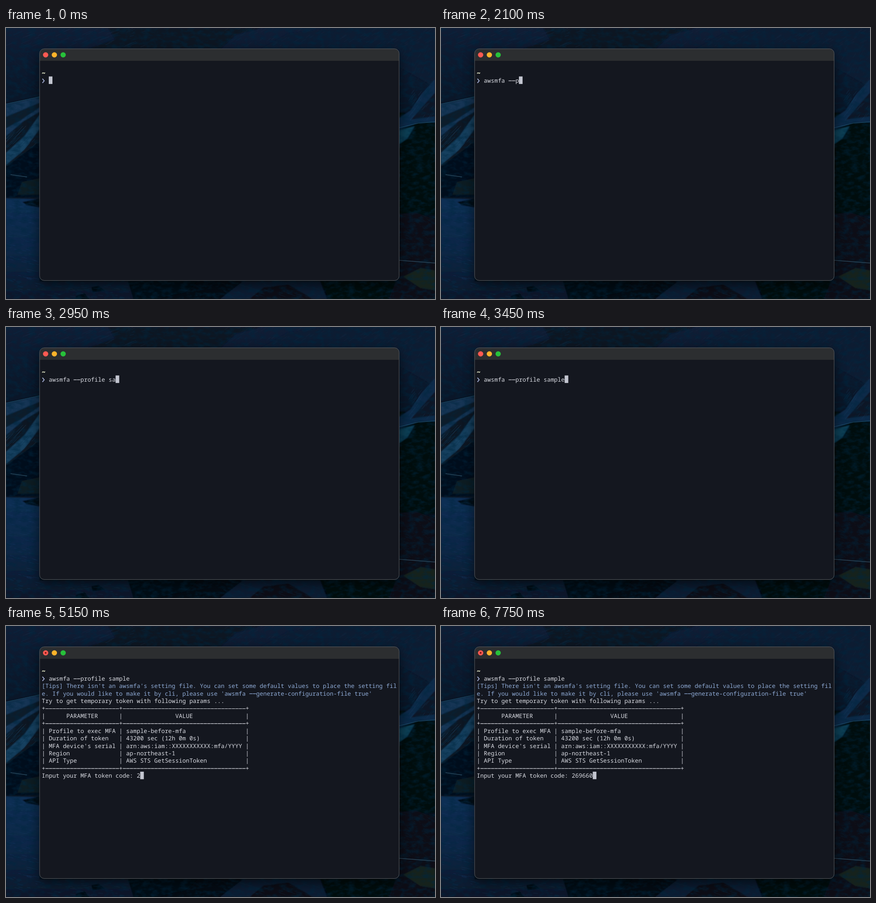
Write an HTML page that moves like this. It is 942 by 595 pixels and loops after 8 s.

```html
<!DOCTYPE html>
<html lang="en">
<head>
<meta charset="utf-8">
<title>Terminal session</title>
<style>
  html, body { margin: 0; width: 100%; height: 100%; overflow: hidden; background: #07111f; }
  svg { display: block; width: 942px; height: 595px; }
  text {
    font: 12.867px "Noto Sans Mono", "DejaVu Sans Mono", monospace;
    white-space: pre;
    text-rendering: geometricPrecision;
    font-variant-ligatures: none;
  }
</style>
</head>
<body>
<svg viewBox="0 0 942 595" xmlns="http://www.w3.org/2000/svg">
  <defs>
    <linearGradient id="hills" x2="0" y2="1">
      <stop offset="0" stop-color="#101d35"/>
      <stop offset=".3" stop-color="#091526"/>
      <stop offset="1" stop-color="#040b13"/>
    </linearGradient>
    <linearGradient id="sea" x2="0" y2="1">
      <stop offset="0" stop-color="#102f54"/>
      <stop offset=".5" stop-color="#0d2747"/>
      <stop offset="1" stop-color="#071729"/>
    </linearGradient>
    <filter id="grain" x="0" y="0" width="1" height="1">
      <feTurbulence type="fractalNoise" baseFrequency=".06 .11" numOctaves="4" seed="4"/>
      <feColorMatrix values="0 0 0 0 0  0 0 0 0 .02  0 0 0 0 .05  2.6 0 0 0 -1.05"/>
    </filter>
    <filter id="soft"><feGaussianBlur stdDeviation="1.1"/></filter>
    <filter id="shadow" x="-10%" y="-10%" width="120%" height="125%"><feGaussianBlur stdDeviation="13"/></filter>
    <clipPath id="frame"><rect x="74" y="46" width="789" height="508.5" rx="10"/></clipPath>
  </defs>

  <g id="wallpaper">
    <rect width="942" height="595" fill="url(#hills)"/>
    <g filter="url(#soft)">
      <path fill="#0a1424" d="M225 0H560L505 14 470 46H180L240 25Z"/>
      <path fill="#0e1c31" d="M560 46 620 12 720 0H942V130L863 85V46Z"/>
      <path fill="#071523" d="M0 166 74 150V375H0Z"/>
      <path fill="#123554" d="M0 168 74 152V184L38 205 0 238Z"/>
      <path fill="#081a2b" d="M0 195 74 164V174L30 204 0 220Z"/>
      <path fill="#17405f" d="M74 190V222L40 267 0 301V274L40 238Z"/>
      <path fill="#05101a" d="M0 305 74 250V372H0Z"/>
      <path fill="#0e1a24" d="M35 338 74 330V366H25Z"/>
      <path fill="url(#sea)" d="M0 374 74 376V556H270L300 595H0Z"/>
      <path fill="#040a12" d="M36 382 74 375V394L45 389ZM268 556H420L395 580 330 595H280ZM155 588 172 582 183 595H152ZM188 569 203 566 217 577 190 580Z"/>
      <path fill="#0b1d31" d="M520 556H690L705 595H470Z"/>
      <path fill="#071018" d="M565 570 620 563 674 595H535Z"/>
      <path fill="#030910" d="M863 185 942 195V410H863ZM690 556H863V595H710Z"/>
      <path fill="#0d2c48" d="M942 112 912 145 888 181 863 198V223L905 208 942 207Z"/>
      <path fill="#071625" d="M942 142 918 169 890 201 942 194Z"/>
      <path fill="#114156" d="M863 224 897 216 882 242 863 255Z"/>
      <path fill="#081018" d="M863 408 900 405 942 420V595H840L863 540Z"/>
      <path fill="#17211f" d="M872 546 910 527 942 532V576L910 571Z"/>
    </g>
    <g id="strokes" fill="none" stroke-linecap="round"></g>
    <rect width="942" height="595" filter="url(#grain)" opacity=".55"/>
    <path fill="none" stroke="#35566b" stroke-width="1.6" opacity=".75" d="M10 322 46 327M863 510 942 516"/>
    <path fill="none" stroke="#2b6487" opacity=".7" d="M0 167 74 151M863 219 905 209 942 206"/>
  </g>

  <rect x="74" y="54" width="789" height="510" rx="12" opacity=".6" filter="url(#shadow)"/>
  <g clip-path="url(#frame)">
    <rect x="73" y="45" width="791" height="511" fill="#14171f"/>
    <rect x="73" y="45" width="791" height="27" fill="#2c2e30"/>
  </g>
  <rect x="73.8" y="45.7" width="789.4" height="508.7" rx="10" fill="none" stroke="#5a5d61"/>
  <circle cx="87" cy="59" r="5.8" fill="#ff5a52"/>
  <circle cx="106.2" cy="59" r="5.8" fill="#fdb32a"/>
  <circle cx="125.5" cy="59" r="5.8" fill="#27c13a"/>
  <circle id="edited" cx="87" cy="59" r="2" fill="#7c1512"/>

  <path fill="none" stroke="#e9edcb" stroke-width="1.6" d="M79.5 100.2C80.5 97.4 82 98.2 82.8 99 83.7 99.9 85 100 85.5 97.8"/>
  <path fill="none" stroke="#a9b4dc" stroke-width="1.8" d="M80 111.4 83.9 116 80 120.6"/>
  <g id="screen"></g>
  <rect id="cursor" width="8" height="16.5" fill="#c3c6d0"/>
</svg>
<script>
const NS = 'http://www.w3.org/2000/svg';
const LOOP = 8000, ENTER = 4050;
const LEFT = 78.6, TOP = 106.4, CELL = 7.72, LINE = 16.42;
const FG = '#d9dbe2', BLUE = '#8fabd6';
const byId = id => document.getElementById(id);
const screen = byId('screen'), cursor = byId('cursor'), edited = byId('edited');

function add(parent, tag, attrs) {
  const el = document.createElementNS(NS, tag);
  for (const key in attrs) el.setAttribute(key, attrs[key]);
  return parent.appendChild(el);
}

// Runs of hyphens are joined, as the terminal's ligatures do.
function makeRow(row, color = FG, col = 0) {
  const x = LEFT + col * CELL, y = TOP + row * LINE;
  const group = add(screen, 'g', {});
  const text = add(group, 'text', { x, y: y + 13.4, fill: color });
  const dashes = add(group, 'path', { stroke: color, 'stroke-width': 1.15, 'stroke-dasharray': '7.12 .6' });
  let shown = null;
  return {
    group,
    write(string) {
      if (string === shown) return;
      shown = string;
      let d = '';
      text.textContent = string.replace(/--+/g, (run, at) => {
        d += `M${x + at * CELL + .3} ${y + 9.4}h${run.length * CELL - .6}`;
        return ' '.repeat(run.length);
      });
      dashes.setAttribute('d', d);
    }
  };
}

const rule = '+' + '-'.repeat(21) + '+' + '-'.repeat(35) + '+';
const cells = (name, value) => `| ${name.padEnd(19)} | ${value.padEnd(33)} |`;
const output = [
  "[Tips] There isn't an awsmfa's setting file. You can set some default values to place the setting fil",
  "e. If you would like to make it by cli, please use 'awsmfa --generate-configuration-file true'",
  'Try to get temporary token with following params ...',
  rule,
  cells('     PARAMETER', ' '.repeat(14) + 'VALUE'),
  rule,
  cells('Profile to exec MFA', 'sample-before-mfa'),
  cells('Duration of token', '43200 sec (12h 0m 0s)'),
  cells("MFA device's serial", 'arn:aws:iam::XXXXXXXXXXX:mfa/YYYY'),
  cells('Region', 'ap-northeast-1'),
  cells('API Type', 'AWS STS GetSessionToken'),
  rule
].map((string, i) => {
  const row = makeRow(i + 1, i < 2 ? BLUE : FG);
  row.write(string);
  return row;
});

const command = {
  text: 'awsmfa --profile sample', row: 0, col: 2, line: makeRow(0, FG, 2),
  keys: [1050, 1150, 1200, 1350, 1450, 1550, 1700, 1800, 1950, 2100,
    2200, 2300, 2350, 2450, 2550, 2650, 2750, 2850, 2950, 3050, 3150, 3250, 3400]
};
const question = 'Input your MFA token code: ';
const token = {
  text: '269660', row: 13, col: question.length, line: makeRow(13),
  keys: [5150, 7150, 7300, 7500, 7600, 7700]
};

const typed = (entry, t) => entry.text.slice(0, entry.keys.filter(key => key <= t).length);

function render(t) {
  const entered = t >= ENTER;
  command.line.write(typed(command, t));
  token.line.write(entered ? question + typed(token, t) : '');
  for (const row of output) row.group.setAttribute('visibility', entered ? 'visible' : 'hidden');
  const active = entered ? token : command;
  cursor.setAttribute('x', LEFT + (active.col + typed(active, t).length) * CELL - .1);
  cursor.setAttribute('y', TOP + active.row * LINE);
  edited.setAttribute('visibility', t >= token.keys[0] ? 'visible' : 'hidden');
}

// Seeded streaks give the slopes and the water their texture.
let seed = 7;
const random = () => (seed = seed * 16807 % 2147483647) / 2147483647;
function streaks(count, x, y, w, h, dx, dy, color) {
  let d = '';
  for (let i = 0; i < count; i++) {
    const size = .4 + random();
    d += `M${x + random() * w} ${y + random() * h}l${dx * size} ${dy * size}`;
  }
  add(byId('strokes'), 'path', { d, stroke: color, 'stroke-width': .8, opacity: .5 });
}
streaks(60, 0, 0, 300, 42, 14, -6, '#1a304b');
streaks(90, 480, 0, 462, 42, 9, -6, '#192e47');
streaks(30, 0, 45, 68, 95, 10, 8, '#13263d');
streaks(45, 865, 45, 72, 85, 5, -8, '#14283f');
streaks(24, 4, 215, 65, 40, -16, 17, '#225276');
streaks(24, 895, 125, 45, 70, -10, 13, '#174466');
streaks(90, 0, 385, 68, 200, 9, 2, '#173e67');
streaks(40, 70, 558, 190, 34, 10, 1, '#173852');
streaks(50, 866, 412, 70, 95, 6, 4, '#17212a');
streaks(35, 470, 558, 220, 34, 12, 4, '#142b40');

function tick() {
  render(performance.now() % LOOP);
  requestAnimationFrame(tick);
}
tick();
</script>
</body>
</html>
```
